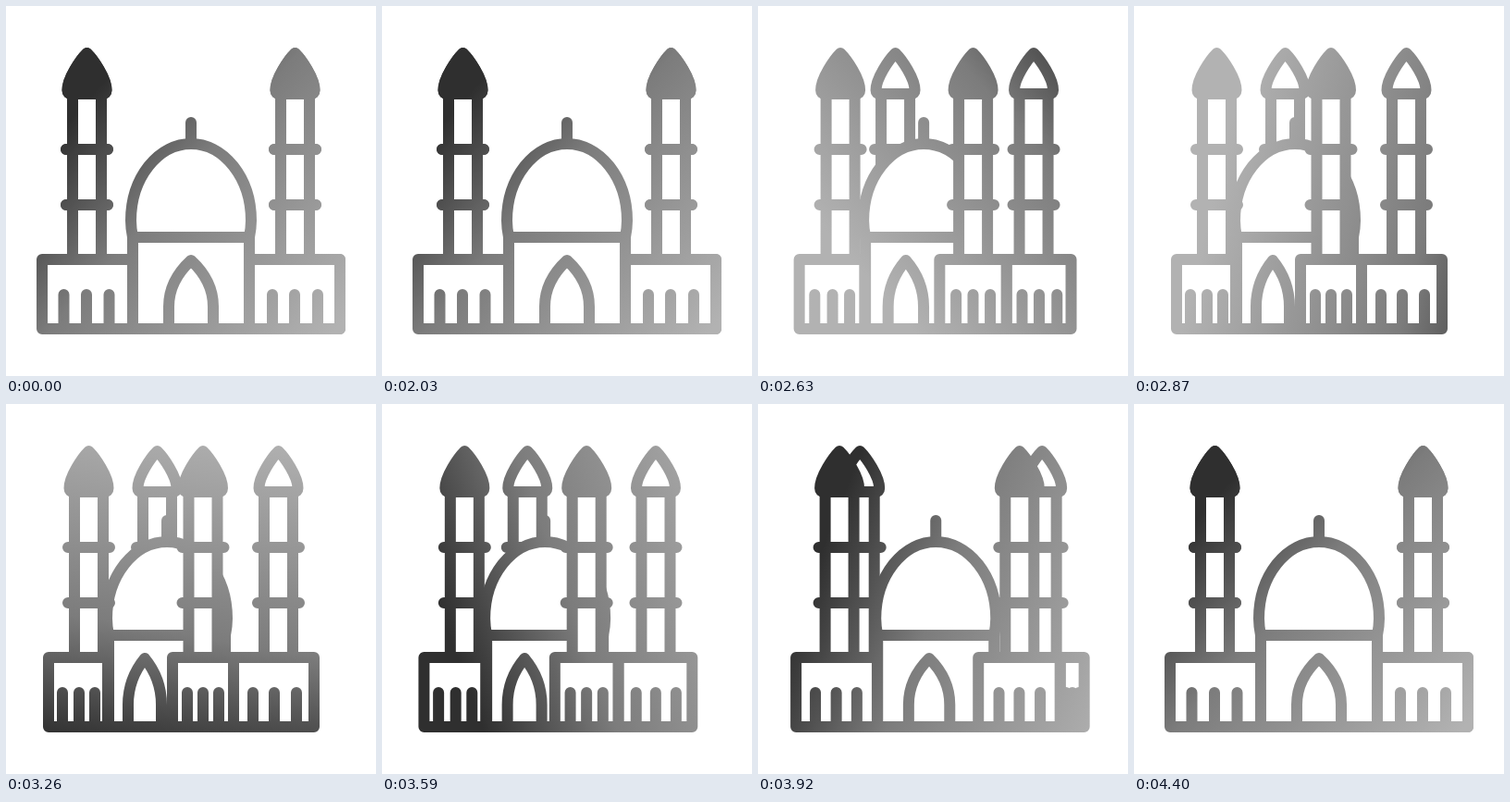
An HTML page with a canvas that plays this animation: 400 px wide and 400 px high, repeating every 4430 ms.

```html
<!DOCTYPE html>
<html lang="en">
<head>
<meta charset="utf-8">
<title>Turning mosque icon</title>
<style>
  html, body { margin: 0; width: 100%; height: 100%; overflow: hidden; background: #fff; }
  canvas { display: block; width: 400px; height: 400px; }
</style>
</head>
<body>
<canvas width="400" height="400"></canvas>
<script>
const ctx = document.querySelector('canvas').getContext('2d');
const LOOP = 4430, START = 2030, END = 4400;

const ramp = (t, from, to) => Math.min(1, Math.max(0, (t - from) / (to - from)));
const smooth = u => u * u * (3 - 2 * u);

function shape(d, fill = '#fff') {
  const path = new Path2D(d);
  ctx.fillStyle = fill;
  ctx.fill(path);
  ctx.stroke(path);
}

function tower(x, roofFill) {
  ctx.save();
  ctx.translate(x, 0);
  shape('M-15.5 95H15.5V274H-15.5Z');
  shape('M-22.5 155H22.5M-22.5 215H22.5');
  shape('M0 51C-7 58-21 78-21 91Q-21 95-17 95H17Q21 95 21 91C21 78 7 58 0 51Z', roofFill);
  ctx.restore();
}

function box(left, right, slits) {
  shape(`M${left} 274H${right}V349H${left}Z`);
  shape(slits.map(x => `M${x} 312V349`).join(''));
}

function hall(x) {
  ctx.save();
  ctx.translate(x, 0);
  shape('M0 126V149');
  shape('M-63 250H63V349H-63Z');
  shape('M-63 250Q-65 240-65 232A65 83 0 0 1 65 232Q65 240 63 250Z');
  ctx.restore();
}

function door(x, w) {
  shape(`M${x - w} 349V325C${x - w} 302 ${x - w / 2} 286 ${x} 275
         C${x + w / 2} 286 ${x + w} 302 ${x + w} 325V349Z`);
}

// Dark-to-light sweep that circles once around an off-centre pivot.
function sweep(t) {
  const u = ramp(t, START, END);
  const turn = 1 - (1 - u ** 1.5) ** 2.3;
  const angle = (42 + 360 * turn) * Math.PI / 180;
  const dx = Math.cos(angle), dy = Math.sin(angle);
  const g = ctx.createLinearGradient(262 - 195 * dx, 200 - 195 * dy, 262 + 170 * dx, 200 + 170 * dy);
  g.addColorStop(0, '#2f2f2f');
  g.addColorStop(0.37, '#7c7c7c');
  g.addColorStop(1, '#b2b2b2');
  return g;
}

function draw(t) {
  const p = smooth(ramp(t, START, 2870)) - smooth(ramp(t, 3465, 4180));
  const mix = (a, b) => a + (b - a) * p;

  ctx.globalCompositeOperation = 'source-over';
  ctx.fillStyle = '#fff';
  ctx.fillRect(0, 0, 400, 400);
  ctx.strokeStyle = '#000';
  ctx.lineWidth = 12;
  ctx.lineCap = ctx.lineJoin = 'round';

  tower(mix(87.5, 163.5));
  tower(mix(312.5, 294.5));
  hall(mix(200, 174));
  door(mix(200, 150), mix(24, 18));

  const corner = mix(361, 246);
  box(corner, mix(361, 333), [mix(361, 267), mix(361, 290), mix(361, 314)]);
  box(mix(39, 46), mix(137, 110), [mix(62.5, 61), mix(87, 79), mix(111.5, 96)]);
  box(mix(263, 180), corner, [mix(288, 196), mix(312, 213), mix(337, 230)]);

  tower(mix(87.5, 89.5), '#000');
  tower(mix(312.5, 213), '#000');

  // Screening tints the black drawing and leaves white untouched.
  ctx.globalCompositeOperation = 'screen';
  ctx.fillStyle = sweep(t);
  ctx.fillRect(0, 0, 400, 400);
}

const began = performance.now();
function frame() {
  draw((performance.now() - began) % LOOP);
  requestAnimationFrame(frame);
}
frame();
</script>
</body>
</html>
```
